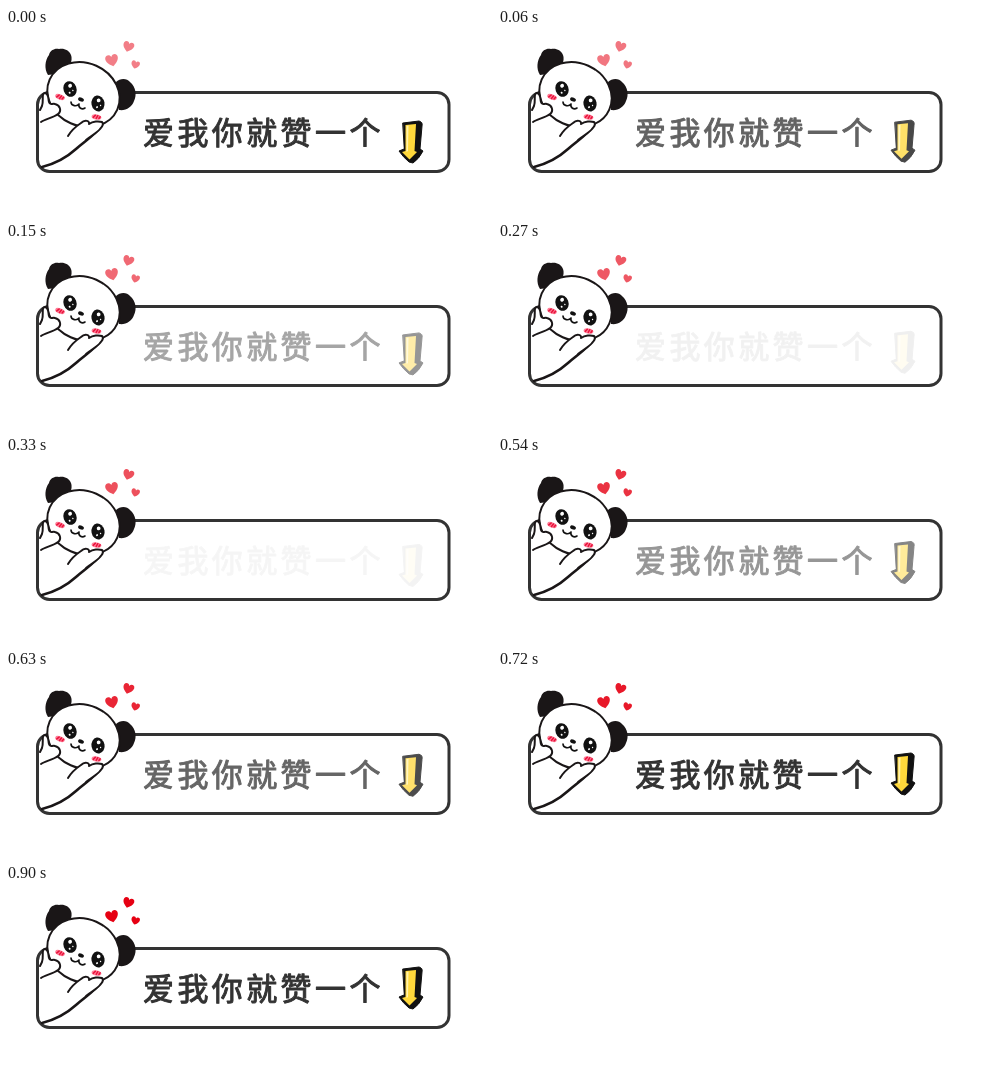
These frames come from a looping animation (486 px wide and 186 px high, 1130 ms). An HTML page:

```html
<!DOCTYPE html>
<html lang="zh">
<head>
<meta charset="utf-8">
<style>
html, body { margin: 0; width: 100%; height: 100%; overflow: hidden; background: #fff; }
svg { display: block; }
text { font: 500 31px "Noto Sans CJK SC", "Noto Sans CJK", sans-serif; letter-spacing: 3.4px; }
</style>
</head>
<body>
<svg width="486" height="186" viewBox="0 0 486 186" stroke-linecap="round" stroke-linejoin="round">
  <defs>
    <path id="heart" d="M0 6C-3 4-7 1-6-3C-5-6-1-6 0-3C1-6 6-6 6-2C6 1 3 4 0 6Z"/>
    <g id="eye">
      <ellipse rx="6.5" ry="8" fill="#111"/>
      <circle cx="1.2" cy="-3" r="1.9" fill="#fff"/>
      <circle cx="-1.6" cy="3.4" r="1" fill="#fff"/>
      <circle cx="2.2" cy="2.4" r=".7" fill="#fff"/>
    </g>
    <g id="blush">
      <ellipse rx="5" ry="2.6" fill="#ff7f98"/>
      <path d="M-3 1L-1.5-1.5M0 1.5L1-1.5M2.7 1L3.5-1" stroke="#e8123b" stroke-width="1.5"/>
    </g>
  </defs>

  <rect x="31.5" y="64.5" width="411.5" height="79" rx="12" fill="#fff" stroke="#333" stroke-width="3"/>

  <g stroke="#1a1617" stroke-width="2" fill="#fff">
    <path d="M34 94L56 82L98 95C89 106 81 112 70 121C59 131 48 136 35 139Z" stroke="none"/>
    <path d="M95 98C88 108 80 112 70 121C59 131 48 136 36 139" fill="none" stroke-width="2.6"/>
    <path d="M42 47C38 41 39 32 43 27C44 22 49 20 53 21C58 20 63 22 65 27C67 32 64 42 57 45Z" fill="#1a1617" stroke="none"/>
    <path d="M110 54C114 50 121 50 124 54C130 59 131 67 128 73C126 79 120 83 113 82Z" fill="#1a1617" stroke="none"/>
    <ellipse cx="77.5" cy="66.5" rx="37" ry="31.5" transform="rotate(24 77.5 66.5)"/>
    <path d="M35 94C39 91 47 90 52 86C56 83 54 77 49 76C46 75 44 78 43 74C42 70 43 66 39 65C35 65 38 73 36 78L34 82"/>
    <path d="M62 108C65 103 69 99 75 95C79 91 84 93 83 96C87 93 93 93 96 94C98 96 96 99 94 101C91 105 86 107 80 112"/>
  </g>

  <use href="#eye" transform="translate(64 61) rotate(-20)"/>
  <use href="#eye" transform="translate(92 75.5) rotate(-10)"/>
  <use href="#blush" transform="translate(54 69) rotate(20)"/>
  <use href="#blush" transform="translate(90.5 89) rotate(12)"/>
  <ellipse cx="75" cy="71.5" rx="3" ry="2" transform="rotate(24 75 71.5)" fill="#111"/>
  <path d="M65 74C65 78 71 79 73 76C72 80 76 82 79 80" fill="none" stroke="#111" stroke-width="1.6"/>

  <g id="hearts" fill="#e60012">
    <use href="#heart" transform="translate(106 32) rotate(-12) scale(1.05)"/>
    <use href="#heart" transform="translate(122.5 18.5) rotate(18) scale(.9)"/>
    <use href="#heart" transform="translate(129.5 36.5) rotate(14) scale(.7)"/>
  </g>

  <g id="message">
    <text x="137" y="116" fill="#333" stroke="#333" stroke-width="1">爱我你就赞一个</text>
    <g id="arrow">
      <path d="M397 95L413 93Q417 94 416 98L414 121L417 123Q413 131 407 135L403 134Q397 129 393 123L398 121Z" fill="#111" stroke="#111"/>
      <path d="M399.5 97L410 96L408.5 123L411 124L403.5 131.5L396 124L399.5 123Z" fill="#ffd83b"/>
      <path d="M400.5 98L402.5 97.5L402 123L400.5 124Z" fill="#fff2ad"/>
    </g>
  </g>
</svg>
<script>
const LOOP = 1130, STEP = 30, SETTLE = 720, LOW = 300;
const [hearts, message, arrow] = ["hearts", "message", "arrow"].map(id => document.getElementById(id));
const clamp = v => Math.max(0, Math.min(1, v));

function draw(now) {
  const t = Math.floor(now % LOOP / STEP) * STEP;
  const fade = t < LOW ? 1 - t / LOW : clamp((t - LOW) / (SETTLE - LOW));
  message.style.opacity = fade ** 1.2;
  arrow.setAttribute("transform", `translate(0 ${-10 * clamp(t / SETTLE)})`);
  hearts.style.opacity = 0.5 + 0.5 * clamp(t / 900);
  requestAnimationFrame(draw);
}
requestAnimationFrame(draw);
</script>
</body>
</html>
```
